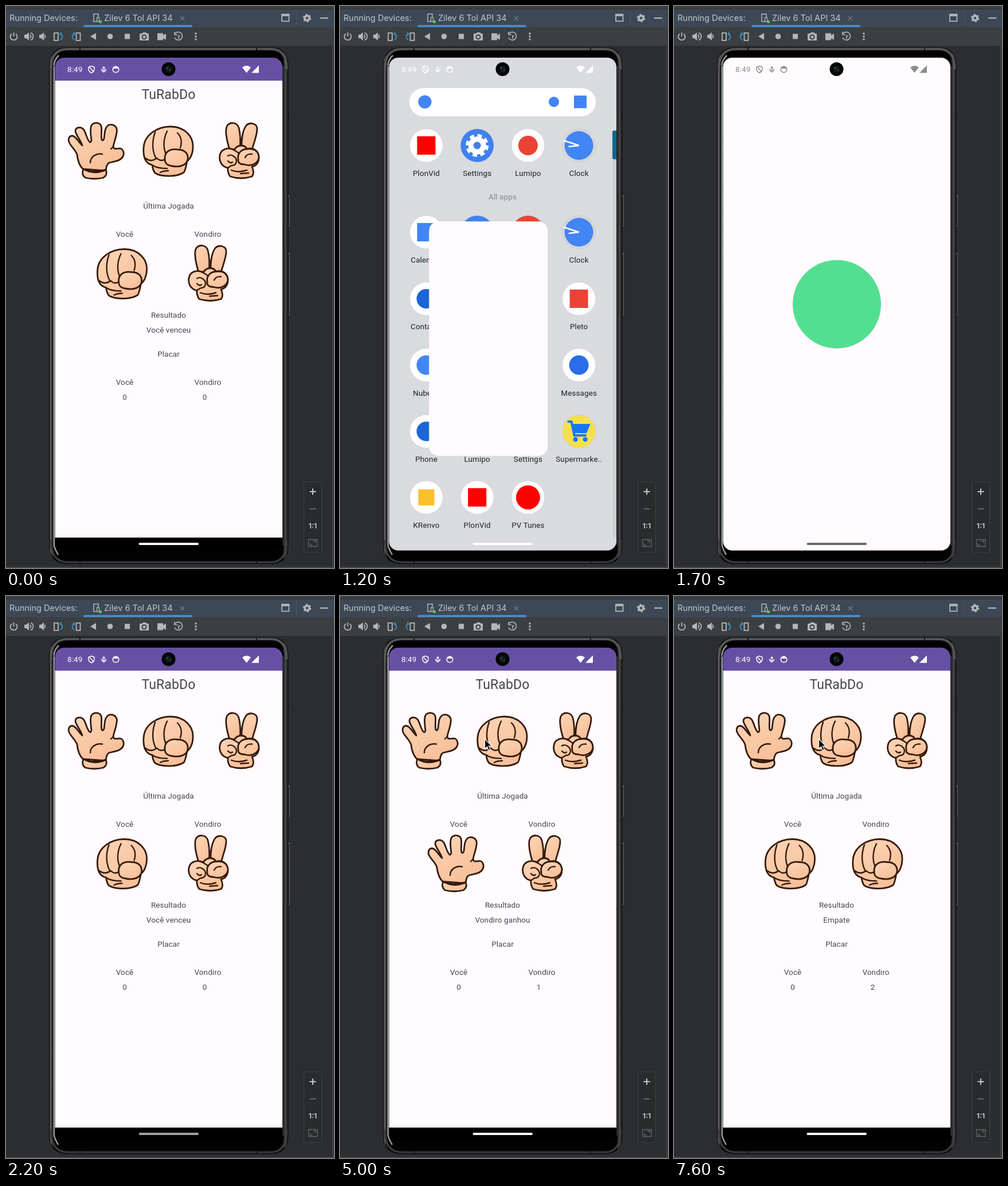
Write an HTML page that moves like this. It is 572 px wide and 979 px high and loops after 8000 ms.

```html
<!DOCTYPE html>
<html lang="pt">
<head>
<meta charset="utf-8">
<title>TuRabDo</title>
<style>
html, body { margin: 0; width: 100%; height: 100%; overflow: hidden; background: #2b2d30; }
svg { display: block; width: 100vw; height: 100vh; }
text { font-family: Roboto, sans-serif; font-size: 13.5px; letter-spacing: .1px; }
.ide { font-family: Inter, sans-serif; font-size: 14.5px; letter-spacing: 0; fill: #c3c7cb; }
.mid { text-anchor: middle; }
.line { fill: none; stroke: #b4b6b8; stroke-width: 1.8; }
.hand { stroke: #351a0b; stroke-width: 2.8; stroke-linecap: round; stroke-linejoin: round; fill: url(#skin); }
.hand .crease { fill: none; stroke-width: 2.4; }
</style>
</head>
<body>
<svg viewBox="0 0 572 979" preserveAspectRatio="none">
<defs>
  <linearGradient id="skin" x1="0" y1="0" x2=".6" y2="1">
    <stop stop-color="#fdd6b8"/><stop offset="1" stop-color="#f8bf98"/>
  </linearGradient>
  <linearGradient id="rim">
    <stop stop-color="#19191a"/><stop offset=".006" stop-color="#6a6b6c"/><stop offset=".012" stop-color="#242425"/>
    <stop offset=".02" stop-color="#080808"/><stop offset=".978" stop-color="#080808"/>
    <stop offset=".988" stop-color="#4b4c4d"/><stop offset="1" stop-color="#161617"/>
  </linearGradient>
  <clipPath id="screen"><rect x="85.5" y="90" width="396.5" height="858.5" rx="16"/></clipPath>

  <g id="paper" class="hand">
    <path d="M134 284C127 277 125 269 124 259C122 252 116 247 112 241C107 234 109 227 115 226C122 226 126 237 133 243C131 235 122 225 121 218C121 211 131 209 136 216C140 223 141 232 146 237Q148 238 149 234C148 226 146 214 149 208C153 202 163 202 166 209C168 216 165 226 167 233Q169 236 171 231C172 222 172 210 180 207C189 205 195 212 193 220C192 230 188 238 187 245C188 251 194 248 199 248C204 249 207 256 204 262C200 270 188 271 180 273C175 276 175 281 174 287Z"/>
    <path d="M135 284Q153 292 174 285Q178 294 170 299Q154 303 138 299Q131 293 135 284Z"/>
    <path class="crease" d="M147 273C147 262 158 256 168 258M187 245L183 249M135 284Q153 295 174 286"/>
  </g>

  <g id="rock" class="hand">
    <path d="M255 277C242 274 239 262 240 247C241 225 263 210 287 210C312 210 327 228 326 246C326 257 321 267 316 270C314 278 313 287 310 290C298 298 271 298 260 291Q256 286 255 277Z"/>
    <path d="M277 267C276 254 286 248 299 250C312 250 318 257 317 267C315 278 302 281 291 279C282 278 277 275 277 267Z"/>
    <path class="crease" d="M260 220C254 237 255 254 262 266M281 218C274 232 274 248 279 258M299 221Q309 231 304 247M243 265Q253 273 263 265Q270 272 277 267M255 277Q263 283 281 283M269 290Q275 287 283 287"/>
  </g>

  <g id="scissors" class="hand">
    <path d="M390 250C385 235 381 215 386 208C392 201 403 203 406 212Q410 228 408 249Z"/>
    <path d="M411 249C410 232 413 216 419 208C425 202 438 204 438 214C438 225 432 238 429 251Z"/>
    <path d="M387 282C376 280 371 270 373 260C375 249 388 245 398 251Q402 243 411 243Q418 244 420 249C432 246 441 253 441 264C441 274 435 279 429 280Q434 291 429 297Q410 303 391 297Q386 290 387 282Z"/>
    <path d="M405 267C403 256 411 249 422 249C434 248 441 254 441 264C440 274 428 280 416 276C407 276 404 272 405 267Z"/>
    <path class="crease" d="M387 261C393 257 401 263 402 269Q402 278 393 278L387 282M387 270Q391 275 395 272M398 251L407 257M417 264Q420 257 429 258M393 286Q405 291 420 286M409 292L423 291"/>
  </g>
</defs>

<!-- tool window -->
<rect width="572" height="979" fill="#2b2d30"/>
<rect width="572" height="70" fill="#3c3f41"/>
<rect y="5" width="572" height="32" fill="#3d4856"/>
<path d="M0 5.5H572M0 69.5H572" stroke="#303336"/>
<rect x="135" y="33" width="190" height="4" rx="2" fill="#4a88c7"/>
<path d="M506.5 9V33" stroke="#4d5764"/>
<path d="M570 70V979M0 978H572" stroke="#414447" stroke-width="2"/>
<text class="ide" x="6" y="26">Running Devices:</text>
<text class="ide" x="171" y="26">Zilev 6 Tol API 34</text>
<g class="line">
  <path d="M304 18L311 25M311 18L304 25" stroke="#78818a" stroke-width="1.2"/>
  <path d="M159 27H153V14H161V19" stroke-width="1.5"/>
  <rect x="158.500" y="20" width="4" height="7" stroke-width="1.300"/>
  <rect x="481" y="14.5" width="12.500" height="12"/>
  <path d="M481 16H494" stroke-width="3.500"/>
  <path d="M548 21H562" stroke-width="2.200"/>
  <circle cx="525" cy="21" r="4" stroke-width="3.500"/>
  <circle cx="525" cy="21" r="6" stroke-width="2.500" stroke-dasharray="3.140"/>
  <path d="M10 48.500A6 6 0 1 0 17 48.500M13.500 46V53"/>
  <path d="M42 50A4 4 0 0 1 42 56M43 46.500A7 7 0 0 1 43 59.500M67 50A4 4 0 0 1 67 56"/>
  <rect x="84" y="47" width="7" height="13"/><rect x="122.500" y="47" width="7" height="13"/>
  <path d="M95 48Q102 53 95 59M97 46L94 48.500 97 51M119 48Q112 53 119 59M117 46L120 48.500 117 51" stroke="#3592c4"/>
  <path d="M295 48A7 7 0 1 1 294 55M294 45V50H299M301 57V52H304" stroke-width="1.700"/>
  <circle cx="241" cy="54" r="3.500" stroke="#3c3f41" stroke-width="1.500"/>
</g>
<circle cx="164.500" cy="27.500" r="2.500" fill="#55d052"/>
<g fill="#b4b6b8">
  <path d="M32 50H35L40 46V60L35 56H32ZM58 50H61L66 46V60L61 56H58ZM157 47V59L147 53Z"/>
  <circle cx="181.500" cy="53" r="4.800"/><rect x="207" y="48.500" width="9" height="9"/>
  <path fill-rule="evenodd" d="M233 48H237L239 46H244L246 48H249V60H233ZM236.500 54A4.500 4.500 0 1 0 245.500 54A4.500 4.500 0 1 0 236.500 54Z"/><circle cx="241" cy="54" r="2.500"/>
  <path d="M264 47.500H274V51L279 48V59L274 56V59.500H264Z"/>
  <circle cx="331" cy="48" r="1.800"/><circle cx="331" cy="53" r="1.800"/><circle cx="331" cy="58" r="1.800"/>
</g>
<rect x="519.500" y="829" width="31" height="123" rx="3" fill="#2a2b2c" stroke="#3f4244"/>
<path d="M529.500 846H540.500M535 840.500V851.500" stroke="#c4c6c8" stroke-width="2"/>
<path d="M529.500 876H540.500" stroke="#626568" stroke-width="2"/>
<text class="ide mid" x="535" y="910" style="font-size:12px;font-weight:700">1:1</text>
<path d="M527.500 929.500H543V941.500H527.500ZM530.500 936V939H534M536 932H540V935" fill="none" stroke="#626568" stroke-width="1.300"/>

<!-- phone body -->
<path d="M493 330V384M493 430V538" stroke="#77797a" stroke-width="3"/>
<path d="M492.500 332V383M492.500 432V537" stroke="#111" stroke-width="2"/>
<rect x="490" y="186" width="3" height="9" fill="#111"/>
<path d="M75.500 104Q75.500 72.500 108 72.500H462Q492 72.500 492 104V940Q492 971.500 462 971.500H108Q75.500 971.500 75.500 940Z" fill="url(#rim)" stroke="#0f0f10"/>
<path d="M78 110Q78 75 108 75H462Q489.500 75 489.500 110" fill="none" stroke="#545556" stroke-width="4"/>
<path d="M78 930Q78 969 108 969H462Q489.500 969 489.500 930" fill="none" stroke="#3c3d3e" stroke-width="3"/>
<path d="M129 72V77M437 72V77M129 967V971M437 967V971" stroke="#171718" stroke-width="2"/>
<path d="M83 110Q82 80 106 80H462Q484 80 485 110V935Q484 965 462 965H106Q83 965 83 935Z" fill="#020202"/>
<path d="M83.500 104Q84 94 92 86M83.800 105V940Q86 948 91 956" fill="none" stroke="#98999c" stroke-width="2.500"/>
<path d="M483.500 105V940" stroke="#4a4b4c" stroke-width="1.500"/>

<g clip-path="url(#screen)">
  <g id="app">
    <rect x="85" y="90" width="398" height="859" fill="#000"/>
    <rect x="85" y="130" width="398" height="796" fill="#fffbfe"/>
    <rect x="85" y="90" width="398" height="40" fill="#6650a4"/>
    <use href="#paper"/><use href="#rock"/><use href="#scissors"/>
    <use id="yourHand" y="213.500"/><use id="rivalHand" y="213.500"/>
    <g id="labels" class="mid" fill="#48454c"></g>
  </g>
  <g id="drawer">
    <rect x="85" y="90" width="398" height="859" fill="#d9dbdf"/>
    <rect x="476" y="217" width="6" height="709" fill="#cdcfd3"/>
    <rect x="475" y="217" width="10" height="50" rx="3" fill="#0b6a8e"/>
    <rect x="121" y="143" width="325" height="49" rx="24.500" fill="#fff"/>
    <circle cx="148" cy="167" r="11.500" fill="#4285f4"/>
    <circle cx="373" cy="167" r="9" fill="#4285f4"/>
    <rect x="408" y="156" width="22" height="22" fill="#4285f4"/>
    <text class="mid" x="283.500" y="337" fill="#85888c">All apps</text>
    <g id="icons" class="mid" fill="#202124"></g>
  </g>
  <g id="splash">
    <rect id="window" fill="#fffbfe"/>
    <circle id="badge" fill="#4ade8c"/>
  </g>
  <g id="status">
    <text x="107" y="115">8:49</text>
    <path d="M149 104.500L154 106.500V110Q154 114 149 116.500Q144 114 144 110V106.500ZM146 107L153 115" fill="none" stroke="currentColor" stroke-width="1.500"/>
    <circle cx="170.500" cy="107.500" r="2"/>
    <path d="M166.500 109.500Q167 114 170.500 115Q174 114 174.500 109.500M168.500 110.500L170.500 113 172.500 110.500" fill="none" stroke="currentColor" stroke-width="1.400"/>
    <circle cx="191.500" cy="110.500" r="5.300" fill="none" stroke="currentColor" stroke-width="1.500"/>
    <path d="M187 109Q191.500 101.500 196 109Z"/>
    <path d="M412 107Q419.500 101 427 107L419.500 116.500ZM428 116.500H441V103.500Z"/>
  </g>
  <rect id="handle" x="231.500" y="935" width="104.500" height="4" rx="2"/>
</g>
<circle cx="283.500" cy="110" r="12" fill="#050506"/>
<circle cx="283.500" cy="110" r="6" fill="#111a1c"/><circle cx="281" cy="108" r="1.500" fill="#3d5555"/><circle cx="286" cy="112" r="1.300" fill="#2f4343"/>
<path id="cursor" d="M0 0V17L4 13.500 6.800 20 9.800 18.700 7 12.300H12Z" fill="#000" stroke="#fff" stroke-width="1.200"/>
</svg>
<script>
const $ = id => document.getElementById(id);
const clamp = v => Math.max(0, Math.min(1, v));
const progress = (t, from, to) => clamp((t - from) / (to - from));
const mix = (a, b, p) => a + (b - a) * p;
const easeOut = p => 1 - (1 - p) ** 2;
const easeInOut = p => p * p * (3 - 2 * p);
const gray = v => `rgb(${v},${v},${v})`;
const set = (id, attrs) => { for (const k in attrs) $(id).setAttribute(k, attrs[k]); };
const show = (id, on) => { $(id).style.display = on ? '' : 'none'; };

const label = (text, x, y, extra = '') => `<text x="${x}" y="${y}" ${extra}>${text}</text>`;
$('labels').innerHTML = [
  label('TuRabDo', 283.5, 162, 'style="font-size:23px"'),
  label('Última Jogada', 283.5, 352.5),
  label('Você', 207, 401.5), label('Vondiro', 352, 401.5),
  label('Resultado', 283.5, 543), label('', 283.5, 569, 'id="result"'),
  label('Placar', 283.5, 611),
  label('Você', 207, 660), label('Vondiro', 352, 660),
  label('0', 207, 686), label('', 346.5, 686, 'id="score"')
].join('');

// Pictograms are centred on the icon plate.
const dot = (color, r = 17) => `<circle r="${r}" fill="${color}"/>`;
const square = (color, s = 32) => `<rect x="${-s / 2}" y="${-s / 2}" width="${s}" height="${s}" fill="${color}"/>`;
const gear = '<g fill="none" stroke="#fff"><circle r="11" stroke-width="9"/><circle r="17" stroke-width="6" stroke-dasharray="7.500 5.850"/></g>';
const clock = dot('#4285f4', 25) + '<path d="M-27-9L0 0L-18 2" fill="none" stroke="#fff" stroke-width="2.500"/>';
const camera = '<path d="M-18-13H-8L-5-18H5L8-13H18V15H-18Z" fill="#f4f6f8"/>' + dot('#4285f4', 9);
const folder = '<path d="M-17-14H-4L0-10H17V15H-17Z" fill="#f4f6f8"/>';
const cart = '<path d="M-20-17H-13L-8 7H13M-11-11H17L12 1H-9" fill="none" stroke="#1677f2" stroke-width="4"/><path d="M-11-11H17L12 1H-9Z" fill="#1677f2"/><circle cx="-6" cy="14" r="4" fill="#1677f2"/><circle cx="11" cy="14" r="4" fill="#1677f2"/>';
const blue = '#4080ee', white = '#fff', pale = '#d3d6da';

const rows = [
  [243, ['PlonVid', white, square('#f00')], ['Settings', blue, gear], ['Lumipo', white, dot('#ea4335')], ['Clock', pale, clock]],
  [394, ['Calendar', white, square('#4285f4')], ['Camera', blue, camera], ['Brulex', '#ea4335', ''], ['Clock', pale, clock]],
  [510, ['Contacts', white, dot('#1a66d6')], ['Stovo', white, square('#34a853')], ['Files', blue, folder], ['Pleto', white, square('#ea4335')]],
  [625.5, ['Nubexo', white, dot('#4285f4')], ['TuRabDo', '#3ddc84', ''], ['Zalp', white, dot('#34a853')], ['Messages', white, dot('#2b6de8')]],
  [741, ['Phone', white, dot('#1a66d6')], ['Lumipo', white, dot('#ea4335')], ['Settings', blue, gear], ['Supermarke..', '#f5e04c', cart]],
  [856, ['KRenvo', white, square('#fbc02d', 28)], ['PlonVid', white, square('#f00')], ['PV Tunes', white, dot('#f00', 21)]]
];
$('icons').innerHTML = rows.map(([y, ...apps]) => apps.map(([name, plate, mark], i) =>
  `<g transform="translate(${150.5 + i * 88.7} ${y})"><circle r="29" fill="${plate}" stroke="#c8cace" stroke-width=".6"/>${mark}${label(name, 0, 53)}</g>`
).join('')).join('');

const leftX = { rock: -80.5, paper: 45 };
const rightX = { rock: 72, paper: 198, scissors: -54 };
const rounds = [
  { at: 0, you: 'rock', rival: 'scissors', result: 'Você venceu', score: 0 },
  { at: 3300, you: 'paper', rival: 'scissors', result: 'Vondiro ganhou', score: 1 },
  { at: 5700, you: 'rock', rival: 'paper', result: 'Vondiro ganhou', score: 2 },
  { at: 7600, you: 'rock', rival: 'rock', result: 'Empate', score: 2 }
];

function drawGame(t) {
  const round = rounds.filter(r => r.at <= t).pop();
  set('yourHand', { href: '#' + round.you, x: leftX[round.you] });
  set('rivalHand', { href: '#' + round.rival, x: rightX[round.rival] });
  $('result').textContent = round.result;
  $('score').textContent = round.score;
}

function drawLaunch(t) {
  show('app', t < 1000 || t >= 1900);
  show('drawer', t >= 1000 && t < 1500);
  show('splash', t >= 1200 && t < 2200);
  const p = easeOut(progress(t, 1100, 1500));
  const x = mix(210, 85, p), y = mix(597, 90, p);
  const width = mix(58, 398, p), height = mix(58, 859, p);
  set('window', { x, y, width, height, rx: mix(29, 0, p) });
  set('badge', { cx: x + width / 2, cy: y + height / 2, r: mix(29, 77, p), opacity: progress(t, 1320, 1720) });
  set('splash', { opacity: 1 - progress(t, 1800, 2100) });

  const inSplash = t >= 1400 && t < 2000;
  const tone = gray(inSplash ? Math.round(mix(255, 105, progress(t, 1380, 1800))) : 255);
  set('status', { fill: tone, color: tone });
  const handle = t >= 1400 && t < 2100 ? 105 : t >= 2100 ? Math.round(mix(160, 255, progress(t, 2300, 2700))) : 255;
  set('handle', { fill: gray(handle) });
}

function drawCursor(t) {
  show('cursor', t >= 2400);
  const enter = easeOut(progress(t, 2300, 3200));
  const move = easeInOut(progress(t, 3600, 4100));
  const x = mix(-12, 138.5, enter) + 114 * move;
  const y = mix(215, 251, enter) - 2 * move;
  set('cursor', { transform: `translate(${x} ${y})` });
}

function frame(now) {
  const t = Math.floor(now % 8000 / 100) * 100;
  drawGame(t);
  drawLaunch(t);
  drawCursor(t);
  requestAnimationFrame(frame);
}
requestAnimationFrame(frame);
</script>
</body>
</html>
```
